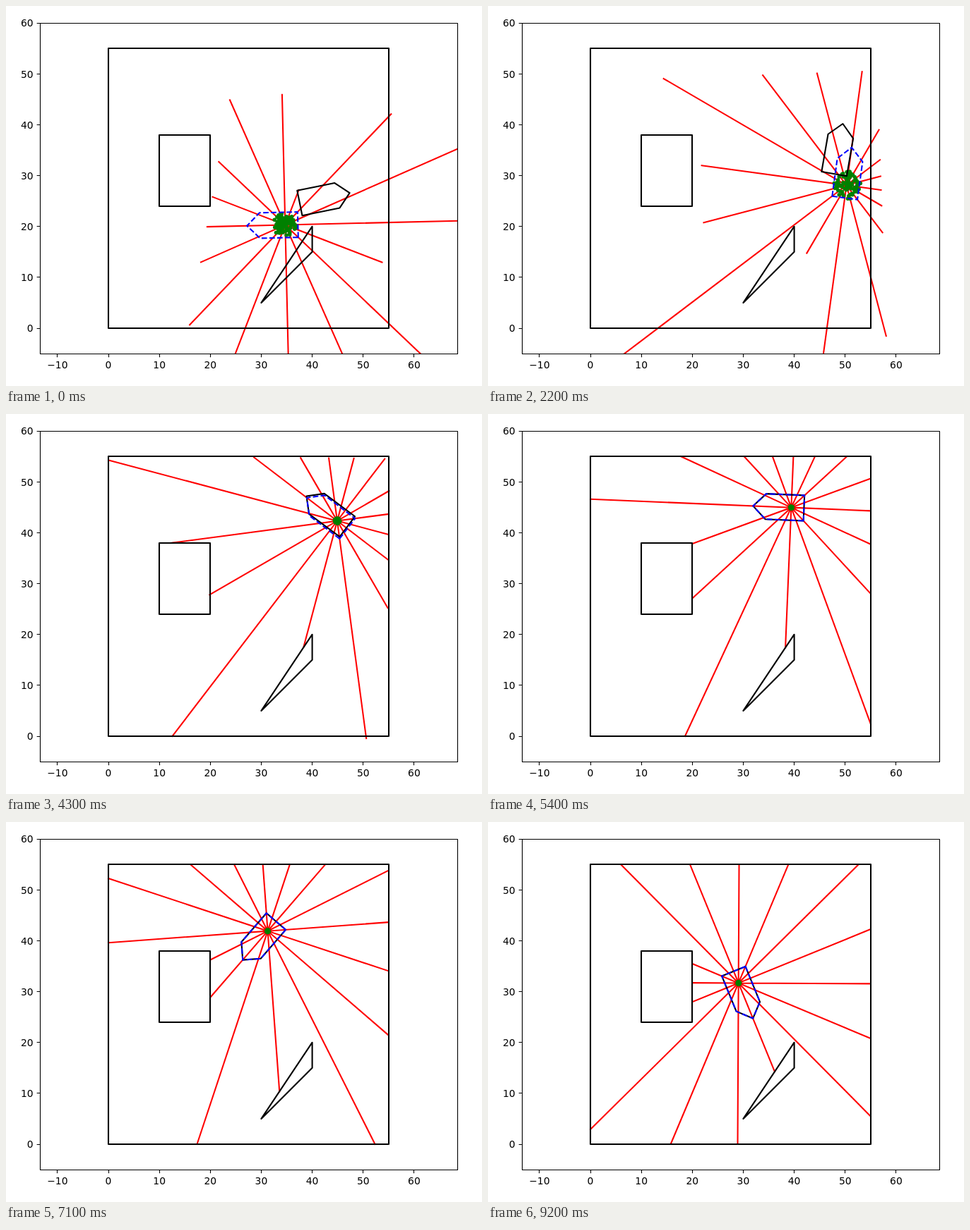
Recreate the animation shown at these times as an HTML page. Size 674 by 539 pixels, loop 9.4 s.

```html
<!DOCTYPE html>
<html lang="en">
<head>
<meta charset="utf-8">
<title>Particle localisation</title>
<style>
  html, body { margin: 0; width: 100%; height: 100%; overflow: hidden; background: #fff; }
  svg { display: block; width: 674px; height: 539px; }
  path { fill: none; stroke-width: 2.083; stroke-linejoin: round; }
  text { font: 13.89px "DejaVu Sans", sans-serif; }
  .axis { stroke: #000; stroke-width: 1.11; }
  .black { stroke: #000; stroke-linecap: square; }
  #rays { stroke: #f00; stroke-linecap: square; }
  #dots { stroke: #008000; stroke-width: 5.5; stroke-linecap: round; }
  #guess { stroke: #00f; stroke-dasharray: 7.71 3.33; }
</style>
</head>
<body>
<svg viewBox="0 0 674 539">
  <clipPath id="plot"><rect x="48.5" y="24.5" width="591" height="469"/></clipPath>
  <g clip-path="url(#plot)">
    <path id="rays"/>
    <path id="dots"/>
    <path id="map" class="black"/>
    <path id="robot" class="black"/>
    <path id="guess"/>
  </g>
  <path id="axes" class="axis" d="M48.5 24.5H639.5V493.5H48.5Z"/>
  <g id="labels"></g>
</svg>
<script>
const $ = id => document.getElementById(id);
const SCALE = 7.215;
const px = x => 145 + SCALE * x;
const py = y => 457 - SCALE * y;
const at = (x, y) => px(x).toFixed(2) + ' ' + py(y).toFixed(2);
const outline = pts => 'M' + pts.map(p => at(...p)).join('L') + 'Z';

// World: outer wall, box and wedge
const walls = [
  [[0, 0], [55, 0], [55, 55], [0, 55]],
  [[10, 24], [20, 24], [20, 38], [10, 38]],
  [[30, 5], [40, 15], [40, 20]]
];
const edges = walls.flatMap(w => w.map((p, i) => [p, w[(i + 1) % w.length]]));
const body = [[-2.5, 2.5], [5, 2.5], [7.5, 0], [5, -2.5], [-2.5, -2.5]];

// Duration of each simulation step, in tenths of a second
const holds = [...'22122222122225012122321223121222132122124122132122'].map(Number);
const LOOP = 9400;

// Estimate error by step: [step, dx, dy, heading in degrees, cloud radius in px]
const errors = [
  [0, -5.3, -4.8, 169.9, 17],
  [7, -6.32, -8.37, 297.6, 22],
  [12, 2, -4.7, 362, 20],
  [18, 0.2, -3.2, 354.5, 18]
];

function errorAt(k) {
  const last = errors[errors.length - 1];
  if (k >= last[0]) {
    const fade = k < 25 ? 0.65 ** (k - last[0]) : 0;
    return [last[1] * fade, last[2] * fade, (last[3] - 360) * fade, 2 + (last[4] - 2) * fade];
  }
  const i = errors.findIndex(e => e[0] > k);
  const a = errors[i - 1], b = errors[i];
  const f = (k - a[0]) / (b[0] - a[0]);
  return a.slice(1).map((v, j) => v + (b[j + 1] - v) * f);
}

// Constant speed 1 and turn rate 0.1 rad per step
function truePose(k) {
  let x = 38, y = 25;
  for (let j = 0; j < k + 2; j++) {
    x += Math.cos(j / 10);
    y += Math.sin(j / 10);
  }
  return [x, y, (k + 2) / 10];
}

function castRay(x, y, angle) {
  const c = Math.cos(angle), s = Math.sin(angle);
  let best = Infinity;
  for (const [[ax, ay], [bx, by]] of edges) {
    const ex = bx - ax, ey = by - ay;
    const det = c * ey - s * ex;
    if (Math.abs(det) < 1e-9) continue;
    const dist = ((ax - x) * ey - (ay - y) * ex) / det;
    const u = ((ax - x) * s - (ay - y) * c) / det;
    if (dist > 0 && u >= 0 && u <= 1) best = Math.min(best, dist);
  }
  return best;
}

function bodyPath([x, y, a]) {
  const c = Math.cos(a), s = Math.sin(a);
  return outline(body.map(([u, v]) => [x + u * c - v * s, y + u * s + v * c]));
}

function random(seed) {
  return () => {
    seed = (seed + 0x6D2B79F5) | 0;
    let t = Math.imul(seed ^ seed >>> 15, 1 | seed);
    t = t + Math.imul(t ^ t >>> 7, 61 | t) ^ t;
    return ((t ^ t >>> 14) >>> 0) / 4294967296;
  };
}

function draw(k) {
  const [x, y, a] = truePose(k);
  const [dx, dy, turn, radius] = errorAt(k);
  const gx = x + dx, gy = y + dy, ga = a + turn * Math.PI / 180;

  let rays = '';
  for (let i = 0; i < 16; i++) {
    const rel = i * Math.PI / 8;
    const d = castRay(x, y, a + rel);
    rays += `M${at(gx, gy)}L${at(gx + d * Math.cos(ga + rel), gy + d * Math.sin(ga + rel))}`;
  }

  const rnd = random(k + 11);
  let dots = '';
  for (let i = 0; i < 90; i++) {
    const r = radius / SCALE * rnd() ** 0.75, t = rnd() * 2 * Math.PI;
    dots += `M${at(gx + r * Math.cos(t), gy + r * Math.sin(t))}h0`;
  }

  $('rays').setAttribute('d', rays);
  $('dots').setAttribute('d', dots);
  $('robot').setAttribute('d', bodyPath([x, y, a]));
  $('guess').setAttribute('d', bodyPath([gx, gy, ga]));
}

function drawAxes() {
  let ticks = '', labels = '';
  const label = (x, y, anchor, v) =>
    labels += `<text x="${x}" y="${y}" text-anchor="${anchor}">${String(v).replace('-', '\u2212')}</text>`;
  for (let v = -10; v <= 60; v += 10) {
    const x = Math.floor(px(v)) + 0.5;
    ticks += `M${x} 493.5v4.86`;
    label(px(v).toFixed(2), 514.3, 'middle', v);
    if (v < 0) continue;
    const y = Math.floor(py(v)) + 0.5;
    ticks += `M48.5 ${y}h-4.86`;
    label(38.6, (py(v) + 5.3).toFixed(2), 'end', v);
  }
  $('axes').setAttribute('d', $('axes').getAttribute('d') + ticks);
  $('labels').innerHTML = labels;
  $('map').setAttribute('d', walls.map((w, i) => {
    if (i === 2) return outline(w);
    return 'M' + w.map(([x, y]) => Math.round(px(x)) + ' ' + Math.round(py(y))).join('L') + 'Z';
  }).join(''));
}

let shown = -1;
const start = performance.now();
function tick() {
  let left = (performance.now() - start) % LOOP;
  let k = 0;
  while (k < holds.length - 1 && left >= holds[k] * 100) left -= holds[k++] * 100;
  if (k !== shown) draw(shown = k);
  requestAnimationFrame(tick);
}

drawAxes();
tick();
</script>
</body>
</html>
```
